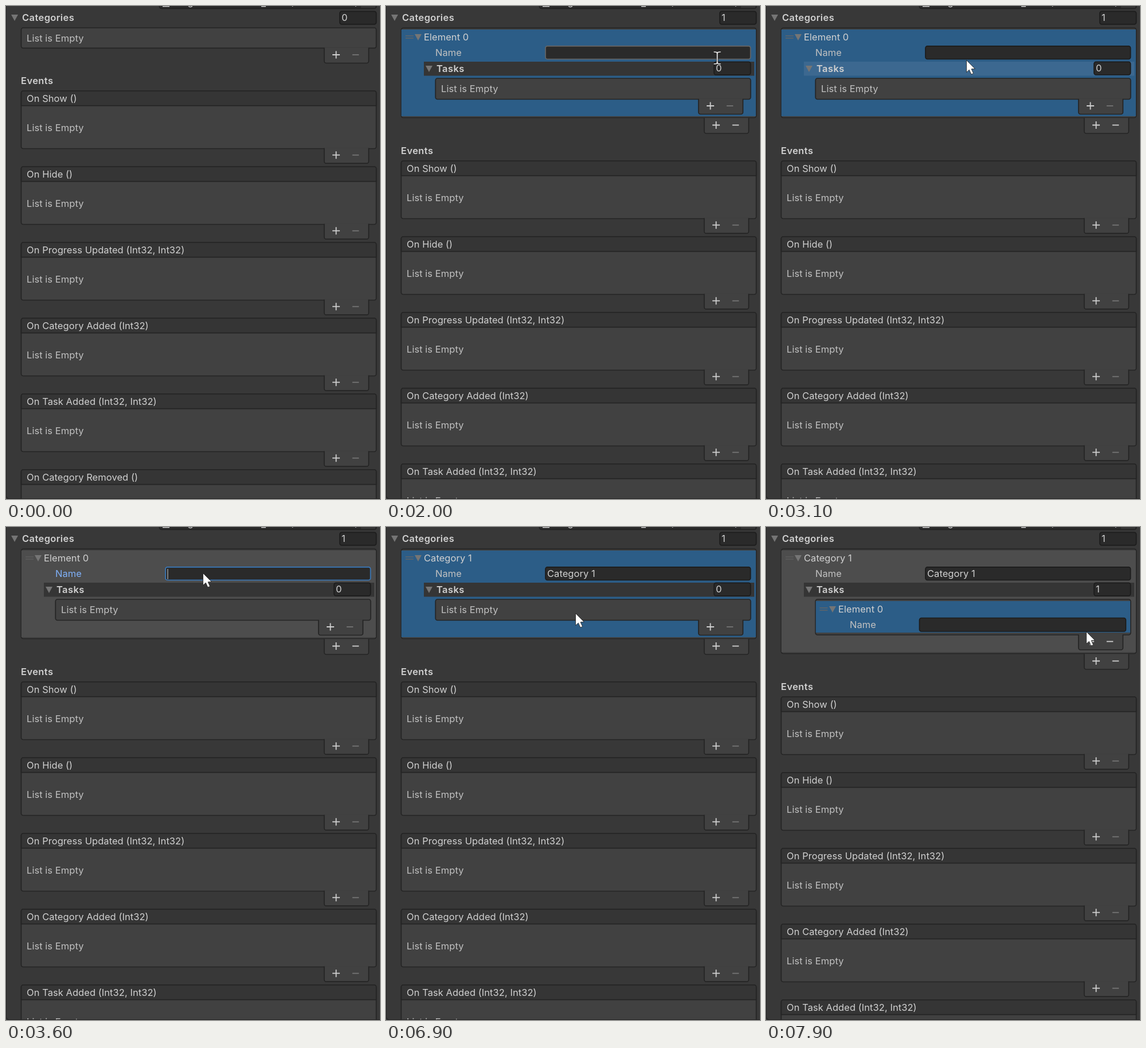
Write an HTML page with a canvas that moves like this. It is 652 px wide and 859 px high and loops after 8000 ms.

```html
<!DOCTYPE html>
<html lang="en">
<head>
<meta charset="utf-8">
<title>Inspector</title>
<style>
html, body { margin: 0; width: 100%; height: 100%; overflow: hidden; background: #383838; }
canvas { display: block; width: 652px; height: 859px; }
</style>
</head>
<body>
<canvas id="stage" width="652" height="859"></canvas>
<script>
const ctx = document.getElementById('stage').getContext('2d');
const LOOP = 8000, STEP = 100;
const C = {
  bg: '#383838', box: '#414141', head: '#353535', line: '#242424', field: '#2a2a2a',
  text: '#d0d0d0', label: '#c0c0c0', off: '#747474', blue: '#2c5d87', grey: '#4d4d4d',
  fold: '#757575', focus: '#3a79bb', focusText: '#7fb0f8'
};
const EVENTS = ['On Show ()', 'On Hide ()', 'On Progress Updated (Int32, Int32)',
  'On Category Added (Int32)', 'On Task Added (Int32, Int32)', 'On Category Removed ()'];
const TYPED = 'Category 1';
const KEY_TIMES = [4500, 4700, 4800, 5000, 5100, 5400, 5600, 5700, 5900, 6000];

// Pointer path: time, x, y
const PATH = [
  [200, 452, 38], [700, 622, 74], [1000, 560, 84], [1100, 569, 88], [1200, 575, 89],
  [2200, 575, 89], [2300, 558, 100], [2700, 465, 136], [3100, 349, 94], [3200, 346, 87],
  [3400, 343, 80], [6400, 343, 80], [6500, 337, 95], [6800, 330, 148], [6900, 330, 150],
  [7300, 590, 174], [7400, 584, 182], [7500, 570, 188], [7600, 562, 185], [7700, 558, 182]
];

function pointer(t) {
  if (t >= 1900 && t < 2300) return { beam: true, x: 577.5, y: 90.5 };
  if (t >= 3700 && t < 6500) return { beam: true, x: t < 4000 ? 345 : 338.5, y: 81.5 };
  if (t < PATH[0][0]) return null;
  const i = PATH.findIndex(p => p[0] > t);
  if (i < 0) { const [, x, y] = PATH[PATH.length - 1]; return { x, y }; }
  const [t0, x0, y0] = PATH[i - 1], [t1, x1, y1] = PATH[i];
  const k = (t - t0) / (t1 - t0);
  return { x: Math.round(x0 + (x1 - x0) * k), y: Math.round(y0 + (y1 - y0) * k) };
}

function text(s, x, mid, color = C.text, bold = false) {
  ctx.font = `${bold ? 600 : 400} 16.5px Inter, sans-serif`;
  ctx.letterSpacing = bold ? '0.4px' : '0.05px';
  ctx.fillStyle = color;
  ctx.fillText(s, x, mid + 6);
}

function rect(x0, y0, x1, y1, color) {
  ctx.fillStyle = color;
  ctx.fillRect(x0, y0, x1 - x0, y1 - y0);
}

function panel(x0, y0, x1, y1, fill = C.box, border = C.line, r = 3.5) {
  ctx.beginPath();
  ctx.roundRect(x0, y0, x1 - x0, y1 - y0, r);
  ctx.fillStyle = fill;
  ctx.fill();
  ctx.strokeStyle = border;
  ctx.lineWidth = 1.7;
  ctx.stroke();
}

function stroke(color, width, ...lines) {
  ctx.beginPath();
  for (const [x0, y0, x1, y1] of lines) {
    ctx.moveTo(x0, y0);
    ctx.lineTo(x1, y1);
  }
  ctx.strokeStyle = color;
  ctx.lineWidth = width;
  ctx.stroke();
}

function fold(x, y) {
  ctx.beginPath();
  ctx.moveTo(x, y);
  ctx.lineTo(x + 12, y);
  ctx.lineTo(x + 6, y + 11);
  ctx.fillStyle = C.fold;
  ctx.fill();
}

// Add / remove tab hanging under a list
function footer(x, y, canRemove) {
  const w = 77.5, h = 26, r = 3.5;
  ctx.fillStyle = C.box;
  ctx.fillRect(x, y - 1, w, 3);
  ctx.beginPath();
  ctx.moveTo(x, y - 0.8);
  ctx.arcTo(x, y + h, x + r, y + h, r);
  ctx.arcTo(x + w, y + h, x + w, y, r);
  ctx.lineTo(x + w, y - 0.8);
  ctx.fill();
  ctx.strokeStyle = C.line;
  ctx.lineWidth = 1.7;
  ctx.stroke();
  const px = x + 20.7, mx = x + 54.7, my = y + 11.5;
  stroke(C.text, 1.8, [px - 6.5, my, px + 6.5, my], [px, my - 6.5, px, my + 6.5]);
  stroke(canRemove ? C.text : C.off, 1.8, [mx - 5.7, my, mx + 5.7, my]);
}

function sizeField(x, y, n) {
  panel(x + 0.8, y, x + 64.5, y + 22.5, C.field, '#1c1c1c');
  text(String(n), x + 4, y + 10.7);
}

function handle(x, y, color) {
  stroke(color, 1.5, [x, y, x + 14, y], [x, y + 4, x + 14, y + 4]);
}

function topField() {
  panel(267.5, -20, 645.5, 4.5, C.field, '#202020');
  rect(619, -1, 644, 3.5, C.head);
  rect(273, -3, 285, 1.5, '#c8c8c8');
  text('Progress Selector', 290, -7);
  rect(445, -3, 453, 1.5, '#c8c8c8');
  text('Text (Inner Content)', 457, -7);
}

function eventList(title, y) {
  panel(26.5, y, 645.5, y + 100.5);
  ctx.beginPath();
  ctx.roundRect(26.5, y, 619, 25.7, [3.5, 3.5, 0, 0]);
  ctx.fillStyle = C.head;
  ctx.fill();
  ctx.strokeStyle = C.line;
  ctx.stroke();
  text(title, 36, y + 13.2);
  text('List is Empty', 36, y + 64, C.label);
  footer(554.8, y + 100.2, false);
}

function taskList(hasTask) {
  const bottom = hasTask ? 188 : 162.5;
  panel(86.3, 126, 635.7, bottom);
  if (hasTask) {
    rect(86.8, 129, 635, 184, C.blue);
    handle(93.5, 141, '#61656a');
    fold(110, 138);
    text('Element 0', 126, 143);
    text('Name', 146, 170, C.label);
    panel(267.5, 158.5, 627.3, 182, C.field, '#1c1c1c');
  } else {
    text('List is Empty', 96, 144, C.label);
  }
  footer(544.8, bottom, hasTask);
}

function category(t, cur) {
  const hasTask = t >= 7900;
  const bottom = hasTask ? 220.5 : 194.5;
  const selected = t < 3600 || (t >= 6800 && !hasTask);
  const focused = t >= 3600 && t < 6800;
  const name = TYPED.slice(0, KEY_TIMES.filter(k => k <= t).length);
  const inside = (y0, y1, x0, x1) => cur.y >= y0 && cur.y < y1 && cur.x > x0 && cur.x < x1;

  panel(26.5, 38.3, 645.5, bottom);
  rect(26.8, 41, 644.8, bottom - 2.5, selected ? C.blue : C.grey);
  handle(34, 52, selected ? '#61656a' : '#5c5c5c');
  fold(50, 49);
  text(name || 'Element 0', 66, 54);

  text('Name', 86, 81, focused ? C.focusText : C.label);
  const border = focused ? C.focus : inside(69, 93, 277, 636) ? '#656565' : '#1c1c1c';
  panel(278, 69.8, 635.5, 92.5, C.field, border);
  text(name, 281, 81);
  if (focused) {
    const x = 282 + (name ? ctx.measureText(name).width : 0);
    stroke('#b8b8b8', 1.2, [x, 73, x, 91]);
  }

  const hover = !cur.beam && inside(93.5, 122, 66, 642);
  rect(66, 97, 642, 121.5, hover ? (selected ? '#3c6890' : '#595959') : C.head);
  fold(69, 104);
  text('Tasks', 88, 109.2, C.text, true);
  sizeField(571, 97.3, hasTask ? 1 : 0);
  taskList(hasTask);
  footer(554.8, bottom + 1.5, true);
}

function drawPointer({ beam, x, y }) {
  if (beam) {
    const lines = [
      [x, y - 9, x, y + 9],
      [x - 6, y - 10.5, x - 1, y - 10], [x + 1, y - 10, x + 6, y - 10.5],
      [x - 6, y + 10.5, x - 1, y + 10], [x + 1, y + 10, x + 6, y + 10.5],
      [x - 1.2, y - 10, x, y - 8], [x + 1.2, y - 10, x, y - 8],
      [x - 1.2, y + 10, x, y + 8], [x + 1.2, y + 10, x, y + 8]
    ];
    stroke('#222', 3.4, ...lines);
    stroke('#f2f2f2', 1.7, ...lines);
    return;
  }
  ctx.beginPath();
  for (const [dx, dy] of [[0.5, 0.5], [0.5, 21.5], [5.3, 17.2], [8.8, 25], [12.6, 23.4], [9.1, 15.8], [15.3, 15.4]]) {
    ctx.lineTo(x + dx, y + dy);
  }
  ctx.closePath();
  ctx.fillStyle = '#fff';
  ctx.fill();
  ctx.strokeStyle = '#1e1e1e';
  ctx.lineWidth = 0.8;
  ctx.stroke();
}

function draw(t) {
  const cur = pointer(t);
  const added = t >= 1800;
  const shift = t >= 7900 ? 148 : added ? 122 : 0;

  rect(0, 0, 652, 859, C.bg);
  topField();
  fold(9, 15);
  text('Categories', 28, 20, C.text, true);
  sizeField(581, 9.3, added ? 1 : 0);

  if (added) {
    category(t, cur);
  } else {
    panel(26.5, 38, 645.5, 73.3);
    text('List is Empty', 36, 56, C.label);
    footer(554.8, 73.5, false);
  }

  text('Events', 26, 129.5 + shift, C.text, true);
  EVENTS.forEach((title, i) => eventList(title, 148 + shift + i * 132));

  ctx.beginPath();
  ctx.roundRect(0.4, -10, 670, 868.6, 5);
  ctx.strokeStyle = '#222';
  ctx.lineWidth = 1.2;
  ctx.stroke();
  if (cur) drawPointer(cur);
}

const start = performance.now();
function tick() {
  const t = (performance.now() - start) % LOOP;
  draw(Math.floor(t / STEP) * STEP);
  requestAnimationFrame(tick);
}
tick();
</script>
</body>
</html>
```
